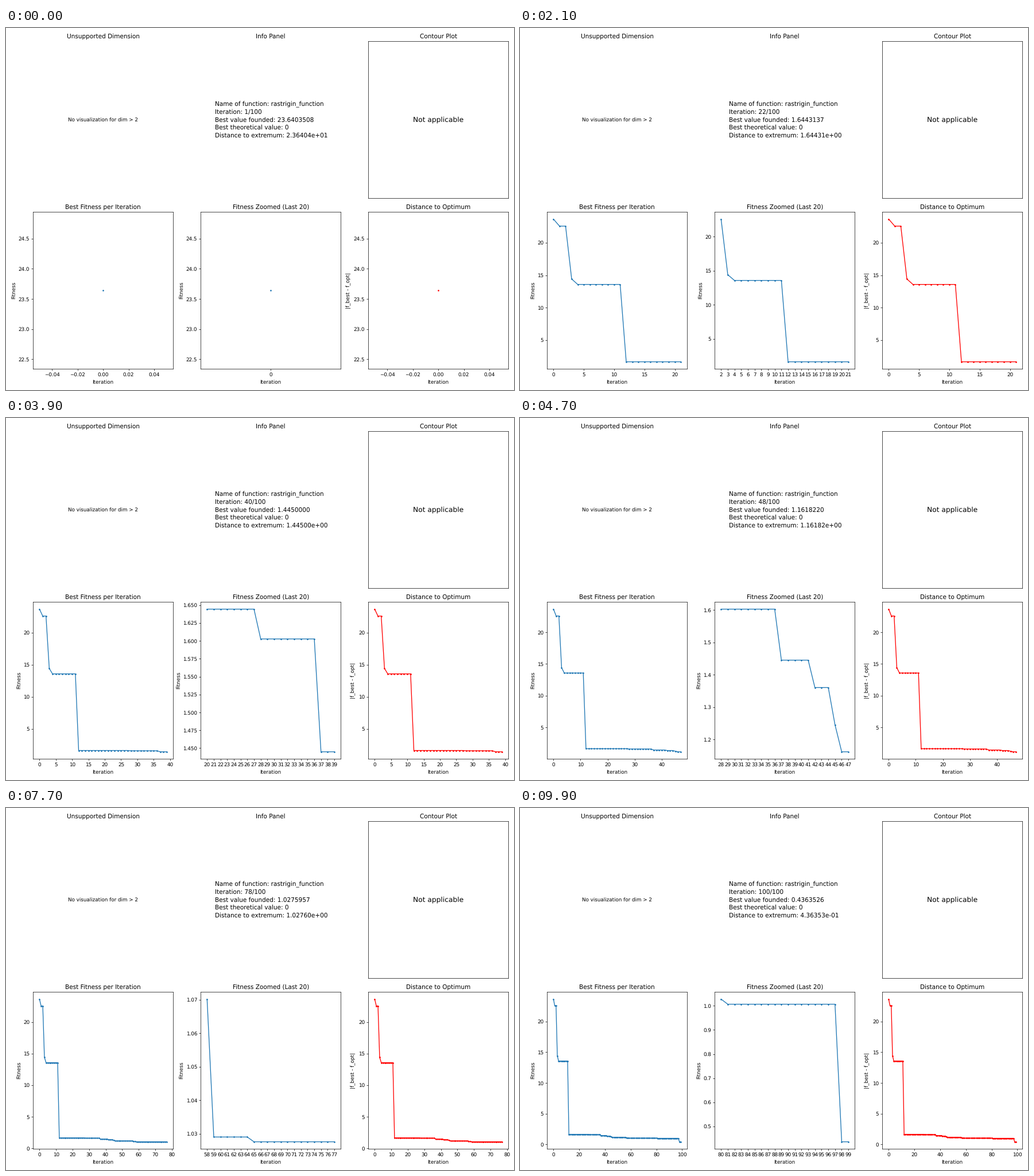
Write a matplotlib script that moves like this. It is 885 px wide and 632 px high and loops after 10000 ms.

```python
import numpy as np
import matplotlib.pyplot as plt
from matplotlib.animation import FuncAnimation

W, H, DPI = 885, 632, 63.2
TOTAL, WINDOW = 100, 20
OPTIMUM = 0

# The search holds its best value until the next improvement.
IMPROVED = {
    0: 23.6403508, 1: 22.56, 3: 14.41, 4: 13.57, 12: 1.6443137,
    28: 1.6026715, 37: 1.445, 42: 1.3604, 45: 1.2453, 46: 1.161822,
    57: 1.0702, 59: 1.0290235, 65: 1.0275957, 81: 1.0065, 98: 0.4363526,
}
held = np.searchsorted(list(IMPROVED), np.arange(TOTAL), side="right") - 1
best = np.array(list(IMPROVED.values()))[held]
distance = np.abs(best - OPTIMUM)

plt.rcParams.update({"font.family": "DejaVu Sans", "text.hinting": "none"})
fig = plt.figure(figsize=((W + 1e-6) / DPI, (H + 1e-6) / DPI), dpi=DPI,
                 facecolor="white")


def panel(col, row, title):
    left, top = 47.2 + 292 * col, 23.2 + 298 * row
    ax = fig.add_axes([left / W, 1 - (top + 274) / H, 244 / W, 274 / H])
    ax.set_title(title, fontsize=12)
    return ax


def chart(col, title, ylabel, color):
    ax = panel(col, 1, title)
    ax.set_xlabel("Iteration")
    ax.set_ylabel(ylabel)
    line, = ax.plot([], [], "o-", color=color, markersize=2)
    return line


def show(line, x, y):
    line.set_data(x, y)
    line.axes.relim()
    line.axes.autoscale_view()


unsupported = panel(0, 0, "Unsupported Dimension")
unsupported.axis("off")
unsupported.text(0.5, 0.5, "No visualization for dim > 2",
                 ha="center", va="center")

info_panel = panel(1, 0, "Info Panel")
info_panel.axis("off")
info = info_panel.text(0.1, 0.5, "", fontsize=12, va="center",
                       linespacing=1.36)

contour = panel(2, 0, "Contour Plot")
contour.set(xticks=[], yticks=[])
contour.text(0.5, 0.5, "Not applicable", fontsize=14,
             ha="center", va="center")

fitness = chart(0, "Best Fitness per Iteration", "Fitness", "tab:blue")
zoomed = chart(1, "Fitness Zoomed (Last 20)", "Fitness", "tab:blue")
gap = chart(2, "Distance to Optimum", "|f_best - f_opt|", "red")


def update(i):
    x = np.arange(i + 1)
    recent = x[-WINDOW:]
    show(fitness, x, best[x])
    show(gap, x, distance[x])
    zoomed.axes.set_xticks([])
    show(zoomed, recent, best[recent])
    zoomed.axes.set_xticks(recent)
    info.set_text(
        "Name of function: rastrigin_function\n"
        f"Iteration: {i + 1}/{TOTAL}\n"
        f"Best value founded: {best[i]:.7f}\n"
        f"Best theoretical value: {OPTIMUM}\n"
        f"Distance to extremum: {distance[i]:.5e}"
    )
    return fitness, zoomed, gap, info


anim = FuncAnimation(fig, update, frames=TOTAL, init_func=lambda: update(0),
                     interval=100, repeat=True, repeat_delay=0, blit=False)
plt.show()
```
